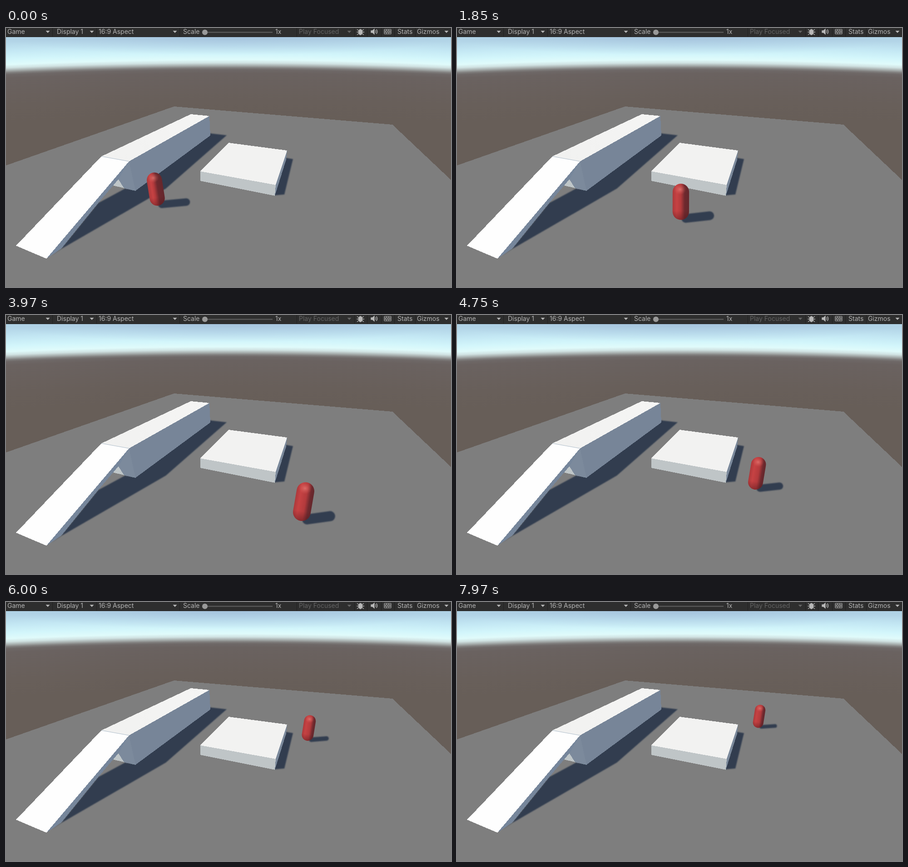
An HTML page that plays this animation: 980 by 571 pixels, repeating every 8000 ms.

```html
<!DOCTYPE html>
<html lang="en">
<head>
<meta charset="utf-8">
<title>Capsule in a game view</title>
<style>
html, body { margin: 0; width: 100%; height: 100%; overflow: hidden; background: #7e7e7e; }
svg { display: block; width: 980px; height: 571px; }
text { font: 14px Inter, Roboto, sans-serif; fill: #b4b4b4; }
.dim { fill: #636363; }
</style>
</head>
<body>
<svg viewBox="0 0 980 571">
  <defs>
    <!-- Rings of a huge circle give the slightly curved horizon. -->
    <radialGradient id="sky" gradientUnits="userSpaceOnUse" cx="490" cy="11000" r="11000" fr="10800">
      <stop offset="0" stop-color="#675e58"/>
      <stop offset=".2" stop-color="#685f5a"/>
      <stop offset=".5" stop-color="#6a6260"/>
      <stop offset=".54" stop-color="#6e6867"/>
      <stop offset=".56" stop-color="#7e7c7b"/>
      <stop offset=".585" stop-color="#a6adac"/>
      <stop offset=".615" stop-color="#d0e2e2"/>
      <stop offset=".65" stop-color="#e0fbfb"/>
      <stop offset=".71" stop-color="#d3f6fb"/>
      <stop offset=".8" stop-color="#c4e8f4"/>
      <stop offset=".9" stop-color="#b4d6e8"/>
      <stop offset="1" stop-color="#acd0e4"/>
    </radialGradient>
    <radialGradient id="zenith">
      <stop offset="0" stop-color="#98b2d2" stop-opacity=".6"/>
      <stop offset="1" stop-color="#98b2d2" stop-opacity="0"/>
    </radialGradient>
    <linearGradient id="beam" gradientUnits="userSpaceOnUse" x1="220" y1="290" x2="440" y2="190">
      <stop offset="0" stop-color="#f1f1f0"/><stop offset="1" stop-color="#f5f5f4"/>
    </linearGradient>
    <linearGradient id="body">
      <stop offset="0" stop-color="#ad393b"/>
      <stop offset=".25" stop-color="#c64243"/>
      <stop stop-color="#b33a3c"/>
      <stop stop-color="#6e292e"/>
      <stop offset="1" stop-color="#64272c"/>
    </linearGradient>
    <linearGradient id="under" x1="0" y1="0" x2="0" y2="1">
      <stop offset=".75" stop-color="#50161b" stop-opacity="0"/>
      <stop offset="1" stop-color="#50161b" stop-opacity=".45"/>
    </linearGradient>
    <radialGradient id="shine">
      <stop offset="0" stop-color="#f08a83" stop-opacity=".6"/>
      <stop offset="1" stop-color="#e0605c" stop-opacity="0"/>
    </radialGradient>
    <filter id="soft" filterUnits="userSpaceOnUse" x="0" y="0" width="980" height="571">
      <feGaussianBlur stdDeviation=".9"/>
    </filter>
  </defs>

  <rect width="980" height="571" fill="url(#sky)"/>
  <ellipse cx="490" cy="15" rx="520" ry="45" fill="url(#zenith)"/>
  <path d="M0 303 370 173 851 213 980 335V571H0Z" fill="#7e7e7e" shape-rendering="crispEdges"/>

  <g fill="#323d50" filter="url(#soft)">
    <path d="M98 503 122 486 203 386 262 354 285 357 447 232 486 236.500 352 354 122 487Z"/>
    <path d="M614 286 632 289 613 367 590 369Z"/>
    <path id="shadow" stroke="#323d50" stroke-linecap="round"/>
  </g>

  <g shape-rendering="crispEdges">
    <path d="M271 294 448 194 450 237 285 359Z" fill="#778598"/>
    <path d="M271 294 285 359 259 353 246 333Z" fill="#7c8a9c"/>
    <path d="M247 333 260 353 235 347Z" fill="#bfc6c8"/>
    <path d="M210 283 407 190 448 194 271 294Z" fill="url(#beam)"/>
    <path d="M271 294 89 508.500 122 486 203 386 248 333Z" fill="#76869b"/>
    <path d="M210 283 271 294 89 508.500 22 480Z" fill="#fefefe"/>
    <path d="M619 270 594 346 592 370 617 290Z" fill="#7b899b"/>
    <path d="M428 316 594 346 592 370 428 337Z" fill="#bfc5c7"/>
    <path d="M490 253 619 270 594 346 428 316Z" fill="#f2f2f1"/>
  </g>
  <path d="M210 283 271 294" stroke="#aebdca"/>

  <g id="capsule">
    <rect x="-1" y="-1" width="2" rx="1" fill="url(#body)"/>
    <rect x="-1" y="-1" width="2" rx="1" fill="url(#under)"/>
    <ellipse cx="-.1" cy="-.3" rx=".75" ry=".65" fill="url(#shine)"/>
  </g>

  <g id="bar">
    <rect width="980" height="20" fill="#2e2e2e"/>
    <rect y="19" width="980" height="1" fill="#232323"/>
    <path d="M432 9.500H587" stroke="#606060" stroke-width="2"/>
    <circle cx="438" cy="9.500" r="6" fill="#999"/>
    <g stroke="#b8b8b8" fill="none" stroke-width="1.300">
      <path d="M773 3 777 6M788 3 784 6M772.500 9H777M789 9H784M773 15 777 12M788 15 784 12"/>
      <ellipse cx="780.500" cy="9" rx="4" ry="6" fill="#b8b8b8"/>
      <path d="M804 6H807L811 2.500V13.500L807 10H804Z" fill="#b8b8b8"/>
      <path d="M813.500 5Q816 8 813.500 11M815.500 3Q820 8 815.500 13"/>
      <path d="M833 3H848V13H833ZM833 6.300H848M833 9.700H848M838 3V6.300M843 3V6.300M836 6.300V9.700M841 6.300V9.700M845 6.300V9.700M838 9.700V13M843 9.700V13" stroke-width="1"/>
    </g>
  </g>
</svg>
<script>
const NS = "http://www.w3.org/2000/svg";
const $ = id => document.getElementById(id);

function add(tag, attrs, text = "") {
  const el = document.createElementNS(NS, tag);
  for (const k in attrs) el.setAttribute(k, attrs[k]);
  el.textContent = text;
  $("bar").append(el);
}

const label = (x, text, cls = "") => add("text", { x, y: 13, class: cls }, text);
const caret = (x, fill = "#b4b4b4") => add("path", { d: `M${x - 4.5} 6h9l-4.500 5Z`, fill });
const divider = x => add("rect", { x, width: 1, height: 19, fill: "#202020" });

label(3, "Game");
label(112, "Display 1");
label(204, "16:9 Aspect");
label(390, "Scale");
label(593, "1x");
label(645, "Play Focused", "dim");
label(862, "Stats");
label(905, "Gizmos");
[92, 189, 372, 970].forEach(x => caret(x));
caret(756, "#636363");
[102, 199, 382, 640, 767, 795, 826, 855, 901].forEach(divider);

// Each walk is a straight line on the floor; zoom is the depth ratio of its two ends.
const corner = [651.5, 434.5], far = [666.8, 266];
const walks = [
  { start: 670, end: 2960, from: [333, 375], to: corner, zoom: 1.18 },
  { start: 3970, end: 6870, from: corner, to: far, zoom: .55 },
  { start: 7860, end: 10000, from: far, to: [456, 252], zoom: 1 }
];
const UP = 200, DOWN = 400;

// Share of the way covered: speed rises evenly, stays, then falls evenly.
function travelled(t, { start, end }) {
  const total = end - start, s = Math.min(Math.max(t - start, 0), total);
  const rise = Math.min(s, UP), fall = Math.max(0, s - total + DOWN);
  return (s - rise + rise * rise / (2 * UP) - fall * fall / (2 * DOWN)) / (total - (UP + DOWN) / 2);
}

function footAt(t) {
  const walk = walks.findLast(w => t >= w.start) || walks[0];
  const v = travelled(t, walk);
  const seen = v / (v + walk.zoom * (1 - v));
  return walk.from.map((a, i) => a + (walk.to[i] - a) * seen);
}

const capsule = $("capsule"), shadow = $("shadow"), stops = $("body").children;
const hulls = capsule.querySelectorAll("rect");
hulls.forEach(h => h.setAttribute("height", 4.4));

const NADIR = { x: 490, y: 1370 };

function draw(t) {
  const [x, y] = footAt(t);
  const r = .0469 * (y - 18);
  const tilt = Math.atan2(x - NADIR.x, NADIR.y - y) * 180 / Math.PI;
  capsule.setAttribute("transform",
    `translate(${x} ${y}) rotate(${tilt}) scale(${r}) translate(0 -2.4)`);

  const dark = .5 + .2 * (x - 330) / 330;
  stops[2].setAttribute("offset", dark - .1);
  stops[3].setAttribute("offset", dark + .13);

  // The floor is seen at a flatter angle further away.
  const width = r * y / 380;
  const tip = x + r * (5.25 - .0019 * x) - 5;
  shadow.setAttribute("stroke-width", width);
  shadow.setAttribute("d",
    `M${x + .6 * r} ${y + .82 * r}L${tip - width / 2} ${y + r * (.92 - y / 950)}`);
}

const begin = performance.now();
function tick() {
  draw((performance.now() - begin) % 8000);
  requestAnimationFrame(tick);
}
tick();
</script>
</body>
</html>
```
